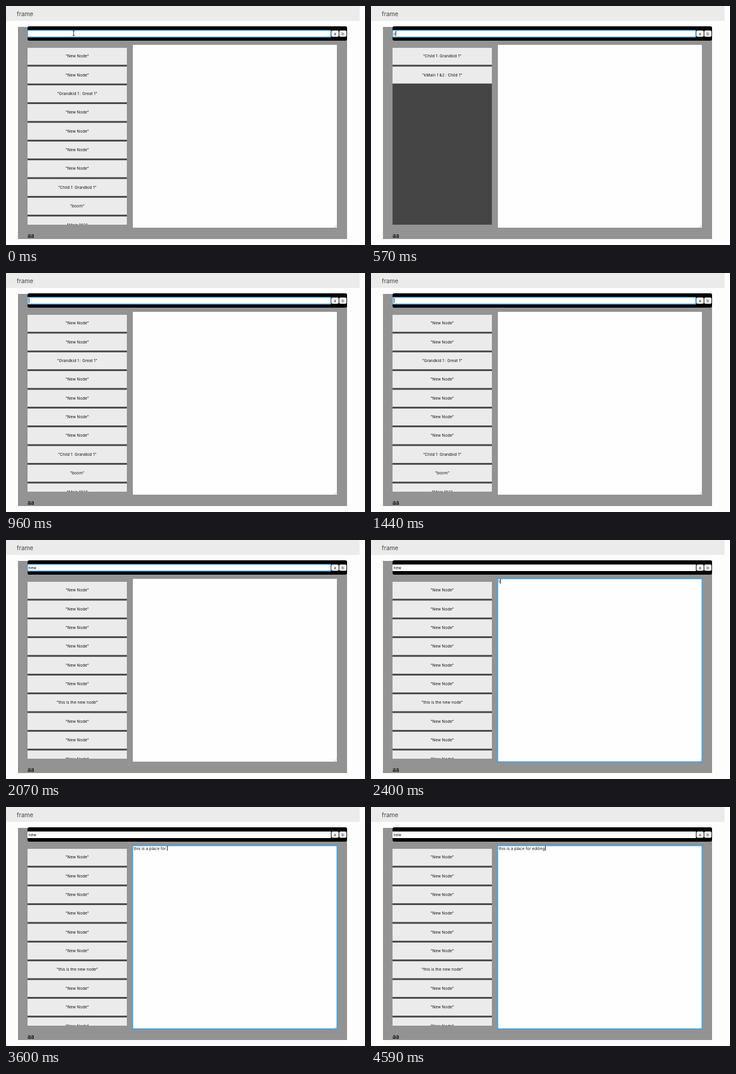
An HTML page with a canvas for the animation above (4740 ms loop, 600 px wide and 400 px high).

```html
<!DOCTYPE html>
<html lang="en">
<head>
<meta charset="utf-8">
<title>frame</title>
<style>
html, body { margin: 0; width: 100%; height: 100%; overflow: hidden; background: #fdfdfd; }
canvas { display: block; width: 600px; height: 400px; }
</style>
</head>
<body>
<canvas id="stage" width="600" height="400"></canvas>
<script>
const ctx = document.getElementById('stage').getContext('2d');
const LOOP = 4740;
const BLINK = 150;
const STEP = 30;
const PITCH = 31.36;
const SANS = 'Inter, "Liberation Sans", sans-serif';
const BLUE = '#4a9fd8';
const WHITE = '#fefefe';
const LIGHT = '#ebebeb';
const PANEL = '#939393';
const DARK = '#454545';

const fresh = n => Array(n).fill('New Node');
const nodes = [
  ...fresh(2), 'Grandkid 1 : Great 1', ...fresh(4), 'Child 1: Grandkid 1', 'boom',
  'Main 1&2', 'kMain 1 &2 : Child 1', 'this is the new node', ...fresh(4)
];

// Each run types or deletes one character at a time until the text equals its goal.
function keys(runs) {
  const out = [];
  let text = '';
  for (const [start, end, goal] of runs) {
    const from = text.length;
    const steps = Math.abs(goal.length - from);
    const longer = goal.length > from ? goal : text;
    const dir = Math.sign(goal.length - from);
    for (let i = 1; i <= steps; i++) {
      const time = start + (end - start) * (i - 1) / Math.max(1, steps - 1);
      text = longer.slice(0, from + dir * i);
      out.push({ time: Math.round(time / STEP) * STEP, text });
    }
  }
  return out;
}

const search = keys([
  [540, 540, 'c'], [630, 750, 'child'], [840, 960, ''],
  [1050, 1200, 'grand'], [1290, 1410, ''], [1500, 1620, 'new']
]);
const note = keys([
  [2400, 2850, 'this is a la'], [2970, 3000, 'this is a '],
  [3090, 3390, 'this is a place '], [3510, 3600, 'this is a place for '],
  [3690, 3990, 'this is a place for editing']
]);

function state(list, t, focusTime) {
  let now = { time: focusTime, text: '' };
  for (const k of list) if (k.time <= t) now = k;
  return now;
}

const caretOn = (t, since) => Math.floor((t - since) / BLINK) % 2 === 0;

function rect(x, y, w, h, fill) {
  ctx.fillStyle = fill;
  ctx.fillRect(x, y, w, h);
}

function round(x, y, w, h, r, fill) {
  ctx.beginPath();
  ctx.roundRect(x, y, w, h, r);
  ctx.fillStyle = fill;
  ctx.fill();
}

function ring(x, y, w, h, r, width) {
  ctx.beginPath();
  ctx.roundRect(x, y, w, h, r);
  ctx.strokeStyle = BLUE;
  ctx.lineWidth = width;
  ctx.stroke();
}

function label(text, x, y, size, align = 'left', color = '#151515', weight = 400) {
  ctx.font = `${weight} ${size}px ${SANS}`;
  ctx.textAlign = align;
  ctx.textBaseline = 'alphabetic';
  ctx.fillStyle = color;
  ctx.fillText(text, x, y);
}

function typed(text, x, y, caret) {
  label(text, x, y, 6.7);
  if (caret) rect(Math.round(x + ctx.measureText(text).width), y - 7, 1, 8, '#222');
}

function beam(x, y) {
  rect(x - 0.5, y - 3, 1, 7, '#222');
  rect(x - 1.5, y - 4, 3, 1, '#222');
  rect(x - 1.5, y + 4, 3, 1, '#222');
}

function drawList(query) {
  ctx.save();
  ctx.beginPath();
  ctx.rect(36, 70, 166, 296);
  ctx.clip();
  rect(36, 70, 166, 296, DARK);
  nodes.filter(n => n.toLowerCase().includes(query)).forEach((name, i) => {
    const y = 70 + i * PITCH;
    rect(36, y, 166, 28.4, LIGHT);
    label(`"${name}"`, 119, y + 16.3, 6.7, 'center');
  });
  ctx.restore();
}

function draw(t) {
  const inSearch = t < 2130;
  const onButton = t >= 2130 && t < 2190;
  const inNote = t >= 2190;
  const query = state(search, t, -BLINK);
  const body = state(note, t, 2250);

  rect(0, 0, 600, 400, '#fdfdfd');
  rect(0, 0, 591, 25, LIGHT);
  label('frame', 18, 16.5, 10, 'left', '#444');

  rect(20, 35, 550, 355, PANEL);
  round(36, 34, 534, 24, 3, '#000');
  rect(36, 41, 507, 11, WHITE);
  if (inSearch) ring(36, 40.7, 507, 11.3, 1, 1.4);
  round(544, 41, 12, 10.5, 2, WHITE);
  round(557, 41, 12, 10.5, 2, WHITE);
  if (onButton) ring(543.5, 40.5, 13, 11.5, 2, 1.5);
  label('a', 550, 48.8, 6.7, 'center');
  label('b', 563, 48.8, 6.7, 'center');
  typed(query.text, 37.5, 49, inSearch && caretOn(t, query.time));

  drawList(query.text);

  rect(212, 65, 341, 306, WHITE);
  ctx.beginPath();
  for (const d of [2, 4]) {
    ctx.moveTo(552.5 - d, 370.5);
    ctx.lineTo(552.5, 370.5 - d);
  }
  ctx.strokeStyle = '#aaa';
  ctx.lineWidth = 0.6;
  ctx.stroke();
  if (inNote) {
    ring(211.5, 64.5, 342, 307, 1.5, 2);
    typed(body.text, 213.5, 72, caretOn(t, body.time));
  }

  label('aa', 36, 388, 9.6, 'left', '#000', 500);

  // The pointer hides at the first key press.
  if (t < search[0].time) beam(113, 45);
}

function tick(now) {
  draw(now % LOOP);
  requestAnimationFrame(tick);
}
draw(0);
requestAnimationFrame(tick);
</script>
</body>
</html>
```
